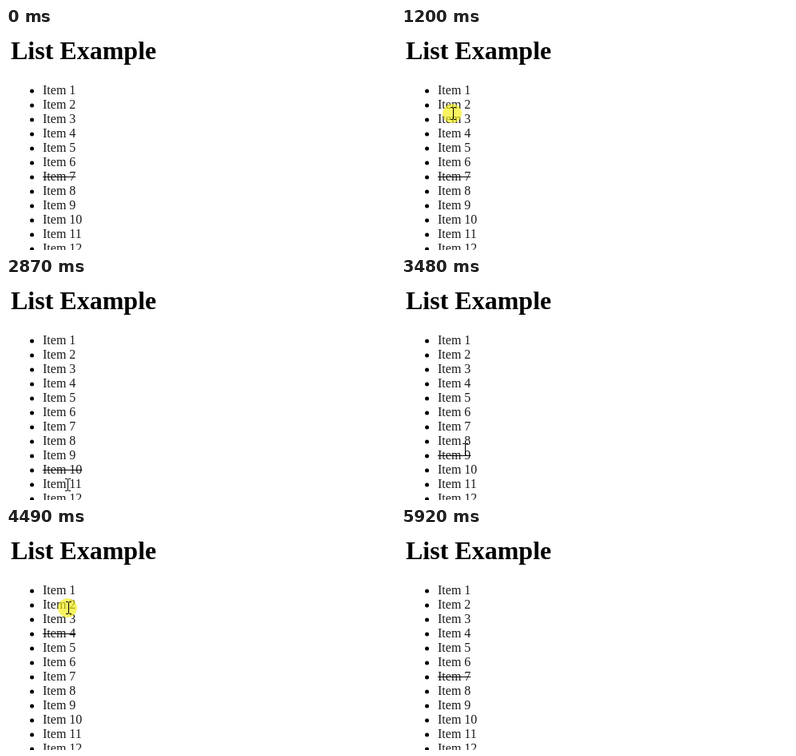
Recreate the animation shown at these times as an HTML page. Size 487 px wide and 278 px high, loop 6.45 s.

```html
<!DOCTYPE html>
<html lang="en">
<head>
<meta charset="utf-8">
<title>List Example</title>
<style>
  html, body { margin: 0; width: 100%; height: 100%; overflow: hidden; background: #fff; }
  svg { display: block; width: 487px; height: 278px; }
  text { font: 16px "Liberation Serif", "Times New Roman", serif; }
  .title { font-size: 32px; font-weight: bold; }
  #list text { fill: #1a1a1a; }
</style>
</head>
<body>
<svg viewBox="0 0 487 278">
  <text class="title" x="6" y="39">List Example</text>
  <g id="list"></g>
  <rect id="strike" x="46" height="1"/>
  <circle id="halo" r="12" fill="#f2ec10" opacity=".65"/>
  <path id="beam" d="M-3-8h3v1h-3zM1-8h3v1h-3zM0-7h1v14h-1zM-3 7h3v1h-3zM1 7h3v1h-3z"/>
  <path id="arrow" d="M.5.5V16.5L4 13l2.5 5.5 2.5-1-2.5-5.5H11.5z" fill="#fff" stroke="#000"/>
</svg>
<script>
const LOOP = 6450, ENTER = 270, LEAVE = 5920, STEP = 67;
const HOLD = 70, SETTLE = 130;   // ms a click lasts, ms the pointer rests before it
const ROW = 18, TOP = 60, TEXT_RIGHT = 88, FIRST_STRUCK = 7;

const $ = id => document.getElementById(id);
const [list, strike, halo, beam, arrow] = ["list", "strike", "halo", "beam", "arrow"].map($);
const rowY = item => TOP + ROW * item;
const itemAt = y => Math.round((y - TOP) / ROW);

const linear = k => k;
const easeIn = k => k * k;
const easeOut = k => 1 - (1 - k) ** 2;

// Each click strikes the item under the pointer: time, x, y
const clicks = [
  [1200, 65, 107], [1750, 62, 146], [2280, 73, 186], [2600, 76, 240],
  [3000, 77, 259], [3400, 80, 222], [3680, 80, 182], [4010, 80, 132],
  [4490, 78, 100], [4840, 74, 74], [5320, 74, 133], [5570, 74, 186]
].map(([time, x, y]) => ({ time, x, y, item: itemAt(y) }));

const stop = (arrive, x, y, leave = arrive, ease = easeOut) => ({ arrive, x, y, leave, ease });
const stops = [
  stop(ENTER, 416, 265),
  stop(880, 113, 109),
  ...clicks.map(c => stop(c.time - SETTLE, c.x, c.y, c.time + HOLD)),
  stop(5850, 199, 225, LEAVE, easeIn)
];

function add(tag, attrs, text = "") {
  const el = document.createElementNS(list.namespaceURI, tag);
  for (const key in attrs) el.setAttribute(key, attrs[key]);
  el.textContent = text;
  list.append(el);
}

for (let item = 1; item <= 12; item++) {
  add("circle", { cx: 32.5, cy: rowY(item) + 1, r: 2.5 });
  add("text", { x: 46, y: rowY(item) + 5 }, "Item " + item);
}

// Sideways motion is eased, vertical motion is steady
function pointerAt(t) {
  const i = Math.max(1, stops.findLastIndex(s => s.arrive <= t) + 1);
  const from = stops[i - 1], to = stops[i] || from;
  const span = to.arrive - from.leave;
  const k = span > 0 ? Math.min(1, Math.max(0, (t - from.leave) / span)) : 0;
  const mix = (axis, ease) => Math.round(from[axis] + (to[axis] - from[axis]) * ease(k));
  return [mix("x", to.ease), mix("y", linear)];
}

function show(el, visible, x, y) {
  el.style.display = visible ? "" : "none";
  el.setAttribute("transform", `translate(${x} ${y})`);
}

function draw(t) {
  const [x, y] = pointerAt(Math.floor((t + 15) / STEP) * STEP);
  const present = t >= ENTER && t < LEAVE;
  const overText = x < TEXT_RIGHT;
  const pressed = clicks.some(c => t >= c.time && t < c.time + HOLD);
  const last = clicks.findLast(c => t >= c.time + HOLD);
  const struck = last ? last.item : FIRST_STRUCK;

  strike.setAttribute("y", rowY(struck));
  strike.setAttribute("width", struck > 9 ? 49.3 : 41.3);
  show(halo, pressed, x - 1, y);
  show(beam, present && overText, x, y);
  show(arrow, present && !overText, x, y);
}

const start = performance.now();
function tick() {
  draw((performance.now() - start) % LOOP);
  requestAnimationFrame(tick);
}
tick();
</script>
</body>
</html>
```
